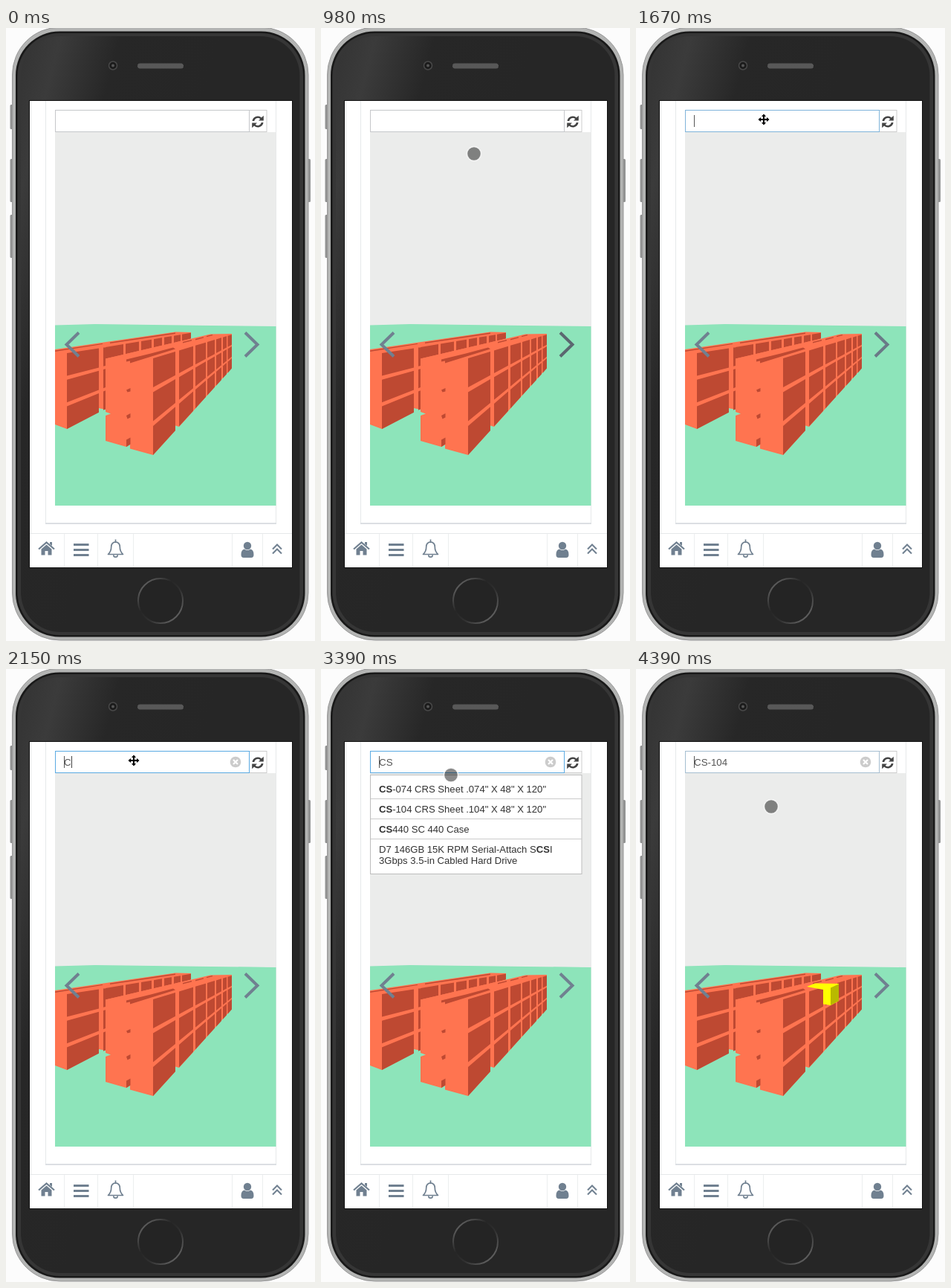
An HTML page that plays this animation: 416 by 824 pixels, repeating every 5.39 s.

```html
<!DOCTYPE html>
<html lang="en">
<head>
<meta charset="utf-8">
<title>Warehouse search on a phone</title>
<style>
  html, body { margin: 0; width: 100%; height: 100%; overflow: hidden; background: #fcfcfc; }
  svg { display: block; font-family: "Liberation Sans", Arial, sans-serif; }
  .line { fill: none; stroke: #708090; }
  .rule { fill: none; stroke: #e6e8ea; }
  .bright { fill: #ff7450; }
  .dark { fill: #be4932; }
</style>
</head>
<body>
<svg width="416" height="824" viewBox="0 0 416 824">
  <defs>
    <linearGradient id="sheen" x1="0" y1="0" x2=".55" y2=".3">
      <stop offset="0" stop-color="#333"/><stop offset=".2" stop-color="#3b3b3b"/>
      <stop offset=".5" stop-color="#272727"/><stop offset="1" stop-color="#262626"/>
    </linearGradient>
    <linearGradient id="ring" x1="0" y1="0" x2="1" y2="1">
      <stop offset="0" stop-color="#777"/><stop offset=".4" stop-color="#262626"/>
      <stop offset=".6" stop-color="#303030"/><stop offset="1" stop-color="#777"/>
    </linearGradient>
    <pattern id="mesh" width="2" height="2" patternUnits="userSpaceOnUse">
      <rect width="2" height="2" fill="#484848"/><path d="M0 0h1v1h-1zM1 1h1v1h-1z" fill="#686868"/>
    </pattern>
    <clipPath id="view"><rect x="66" y="140" width="297.5" height="502"/></clipPath>
  </defs>

  <!-- Phone -->
  <g fill="#929393">
    <rect x="5.5" y="103" width="5" height="33" rx="1.5"/>
    <rect x="5.5" y="176" width="5" height="58" rx="1.5"/>
    <rect x="5.5" y="251" width="5" height="58" rx="1.5"/>
    <rect x="405" y="176" width="5" height="58" rx="1.5"/>
  </g>
  <rect x="8.5" y="-1" width="398.5" height="824" rx="64" fill="#b3b4b3" stroke="#969696"/>
  <rect x="13" y="4.5" width="389.5" height="814" rx="59" fill="#191919"/>
  <rect x="15.5" y="7" width="384.5" height="809" rx="57" fill="#363636"/>
  <rect x="20" y="11" width="375.5" height="801" rx="53" fill="url(#sheen)"/>
  <circle cx="144" cy="50.5" r="5.5" fill="#1b1b1b" stroke="#494949" stroke-width="1.5"/>
  <circle cx="144" cy="50.5" r="2" fill="#555"/>
  <rect x="177" y="47.5" width="62" height="7" rx="3.5" fill="url(#mesh)"/>
  <circle cx="208" cy="770" r="30" fill="#242424" stroke="url(#ring)" stroke-width="2"/>

  <!-- Page -->
  <rect x="31.5" y="97.5" width="354" height="628" fill="#fff" stroke="#111"/>
  <path class="rule" d="M33.5 98V679M53.5 98V666M363.5 98V666"/>
  <path d="M53 666H364" stroke="#dcdfe3" stroke-width="1.8"/>
  <path class="rule" d="M32 679.5H385"/>
  <path class="rule" d="M78.5 680V725M123.5 680V725M171.5 680V725M304.5 680V725M345.5 680V725" opacity=".75"/>

  <!-- Toolbar -->
  <g fill="#708090">
    <path d="M47.5 700.5L54.5 694.5L61.5 700.5V708.5H56.5V703H52.5V708.5H47.5ZM59 691h3v5l-3-2.5z"/>
    <path d="M91 693h20.5v3h-20.5zM91 700h20.5v3h-20.5zM91 707h20.5v3h-20.5z"/>
    <circle cx="325" cy="696" r="5.2"/>
    <path d="M321 700.5Q325 703.5 329 700.5Q333.5 701 333.5 708Q333.5 712 330 712H320Q316.5 712 316.5 708Q316.5 701 321 700.5Z"/>
  </g>
  <path class="line" stroke-width="2.2" d="M44 700.5L54.5 691.5L65 700.5"/>
  <path class="line" stroke-width="1.7" stroke-linejoin="round" d="M147.5 687.5v3M137.5 707.5q4.2-4 4.2-10q0-6 5.8-6.7q5.8.7 5.8 6.7q0 6 4.2 10zM144.8 708.5a2.7 2.7 0 0 0 5.4 0"/>
  <path class="line" stroke-width="2" d="M359 700.5l6-6l6 6M359 706.5l6-6l6 6"/>

  <!-- Warehouse -->
  <g clip-path="url(#view)">
    <rect x="66" y="140" width="298" height="262" fill="#ebeceb"/>
    <path d="M66 399.5L120 398L364 401V642H66Z" fill="#8de4ba"/>
    <path class="bright" d="M66 432L228 408.5L249 409V416L134 513L125 511V516L82 539L66 533Z"/>
    <path class="dark" d="M66 433.5L130 424L130 425L66 435ZM140 422.5L228 409.5V411L140 424Z"/>
    <path class="dark" id="rearSide"/>
    <path class="bright" d="M134 444.5L275 411.5L304 411V457L233 536L228 534.5V541L198 574L167 565.5V560L162 563L134 555V521L141 518.5L134 516Z"/>
    <path class="dark" d="M162 445.5L195 437.5L225 429.5L228 431.5L167 450.5V447.5L162 448.5ZM162 486.5l5.500-2.500v4.500l-4 1zM162 521l5.500-3v5.500l-4 2zM162 563l5.500-3.500v-9l-5.500 3z"/>
    <path class="dark" d="M238 422l12-3v1.500l-12 3zM255 418l11-2.800v1.300l-11 3zM270 414l8-2v1.200l-8 2z"/>
    <path class="dark" id="frontSide"/>
    <g id="found">
      <path d="M230 427L241 422.500L273 423V446L262 452L252 450.500V431Z" fill="#ff0"/>
      <path d="M262 428.500L273 423.500V446L262 452Z" fill="#b9b900"/>
    </g>
  </g>
  <g fill="none" stroke-width="4">
    <path d="M98 409.500L81.500 425.500L98 441.500" stroke="#708090"/>
    <path id="next" d="M322 409.500L338.500 425.500L322 441.500"/>
  </g>

  <!-- Search field -->
  <rect x="327.500" y="110.500" width="23.500" height="29" fill="#fff" stroke="#ccc"/>
  <rect id="field" x="66.500" y="110.500" width="261" height="29" fill="#fff"/>
  <g id="refresh">
    <path id="arrow" d="M331.500 125A7.500 7.500 0 0 1 344 120.500L346.800 117.800V124.500H340L342.300 122.200A4.900 4.900 0 0 0 334.300 125Z" fill="#444"/>
    <use href="#arrow" transform="rotate(180 339 126)"/>
  </g>
  <g id="clear">
    <circle cx="309" cy="125" r="7.300" fill="#ccc"/>
    <path d="M306 122l6 6M312 122l-6 6" stroke="#fff" stroke-width="2.200"/>
  </g>
  <text id="query" x="78" y="130" font-size="13.330" fill="#555"></text>
  <path id="startCaret" d="M78.500 117V133" stroke="#555"/>
  <path id="endCaret" d="M0 117V133" stroke="#444"/>

  <!-- Suggestions -->
  <g id="list" font-size="13.100" fill="#333">
    <rect x="66.500" y="142.500" width="284.500" height="133" fill="#fff" stroke="#bdbdbd"/>
    <path d="M67 174.500H351M67 201.500H351M67 228.500H351" stroke="#ccc"/>
    <text x="78" y="166"><tspan font-weight="bold">CS</tspan>-074 CRS Sheet .074" X 48" X 120"</text>
    <text x="78" y="193"><tspan font-weight="bold">CS</tspan>-104 CRS Sheet .104" X 48" X 120"</text>
    <text x="78" y="220"><tspan font-weight="bold">CS</tspan>440 SC 440 Case</text>
    <text x="78" y="247">D7 146GB 15K RPM Serial-Attach S<tspan font-weight="bold">CS</tspan>I</text>
    <text x="78" y="262">3Gbps 3.5-in Cabled Hard Drive</text>
  </g>

  <!-- Pointers -->
  <circle id="touch" r="9.500" fill="#000" fill-opacity=".46" stroke="#fff" stroke-opacity=".8" stroke-width="1.500"/>
  <path id="move" transform="translate(172 123)" stroke="#fff" stroke-width="1.500" paint-order="stroke"
    d="M0-7.500L3-4H1V-1H4V-3L7.500 0L4 3V1H1V4H3L0 7.500L-3 4H-1V1H-4V3L-7.500 0L-4-3V-1H-1V-4H-3Z"/>
</svg>
<script>
const LOOP = 5390, STEP = 76.67;
const el = id => document.getElementById(id);
const show = (id, on) => el(id).style.display = on ? "" : "none";
const clamp = v => Math.max(0, Math.min(1, v));
const mix = (a, b, k) => `rgb(${a.map((v, i) => Math.round(v + (b[i] - v) * k))})`;

// Rows of stacked boxes whose edges all run to one vanishing point.
const VANISH = { x: 361, y: 395 };
function sidePath(x0, top, bottom, columns) {
  const y = (x, level) => VANISH.y +
    (top + (bottom - top) * level - VANISH.y) * (VANISH.x - x) / (VANISH.x - x0);
  return columns.flatMap(([a, b]) => [0, .35, .7].map(u =>
    `M${a} ${y(a, u)}L${b} ${y(b, u)}V${y(b, u + .3)}L${a} ${y(a, u + .3)}Z`)).join("");
}
el("frontSide").setAttribute("d", sidePath(198, 444, 574,
  [[198, 228], [233, 252], [255, 269], [271, 281], [283, 290], [292, 297], [298.5, 304]]));

// The rear row is hidden below the front row's top edge.
const rear = sidePath(82, 437, 539, [[82, 125], [131, 134]]);
const rearTops = [[134, 158], [161, 179], [182, 196], [199, 210], [213, 223], [226, 235], [237, 249]]
  .map(([a, b]) => {
    const top = x => 429 - (x - 134) * .167, low = x => 444.5 - (x - 134) * .234;
    return `M${a} ${top(a)}L${b} ${top(b)}V${low(b)}L${a} ${low(a)}Z`;
  }).join("");
el("rearSide").setAttribute("d", rear + rearTops);

// Pointer path: time, x, y
const path = [
  [520, 333, 757], [597, 309, 545], [673, 287, 399], [750, 263, 309], [827, 241, 248],
  [903, 222, 202], [980, 206, 169], [1057, 189, 143], [1133, 177, 128], [1210, 172, 123],
  [3230, 172, 123], [3307, 173, 130], [3460, 177, 155], [3613, 181, 180], [3690, 182, 185]
];
function pointerAt(t) {
  const i = path.findIndex(p => p[0] > t);
  if (i < 0) return path.at(-1).slice(1);
  const [t0, x0, y0] = path[Math.max(0, i - 1)], [t1, x1, y1] = path[i];
  const k = t1 > t0 ? clamp((t - t0) / (t1 - t0)) : 0;
  return [x0 + (x1 - x0) * k, y0 + (y1 - y0) * k];
}
const stepped = (t, start) => t < start ? t : start + Math.floor((t - start) / STEP + .01) * STEP;

function draw(now) {
  const t = now % LOOP;
  const tick = stepped(t, t < 3230 ? 520 : 3230);
  const [x, y] = pointerAt(tick);
  const editing = t >= 1520 && t < 3080;

  el("touch").setAttribute("transform", `translate(${x} ${y})`);
  show("touch", t >= 520 && !editing);
  show("move", editing);

  const hover = clamp((tick - 700) / 280) * clamp((1750 - tick) / 300);
  el("next").setAttribute("stroke", mix([112, 128, 144], [91, 103, 112], hover));

  const focus = t < 4230 ? clamp((tick - 1520) / 230) : t < 4310 ? 1 : t < 4390 ? .6 : .3;
  el("field").setAttribute("stroke", mix([197, 199, 202], [90, 170, 226], focus));

  const query = t < 2150 ? "" : t < 2690 ? "C" : t < 4310 ? "CS" : "CS-104";
  el("query").textContent = query;
  show("clear", query);
  show("startCaret", t >= 1520);
  show("endCaret", query && t < 3300);
  el("endCaret").setAttribute("transform", `translate(${query === "C" ? 88.5 : 96.5} 0)`);

  show("list", t >= 2690 && t < 4310);
  show("found", t >= 4390);
}
function frame() {
  draw(performance.now());
  requestAnimationFrame(frame);
}
frame();
</script>
</body>
</html>
```
